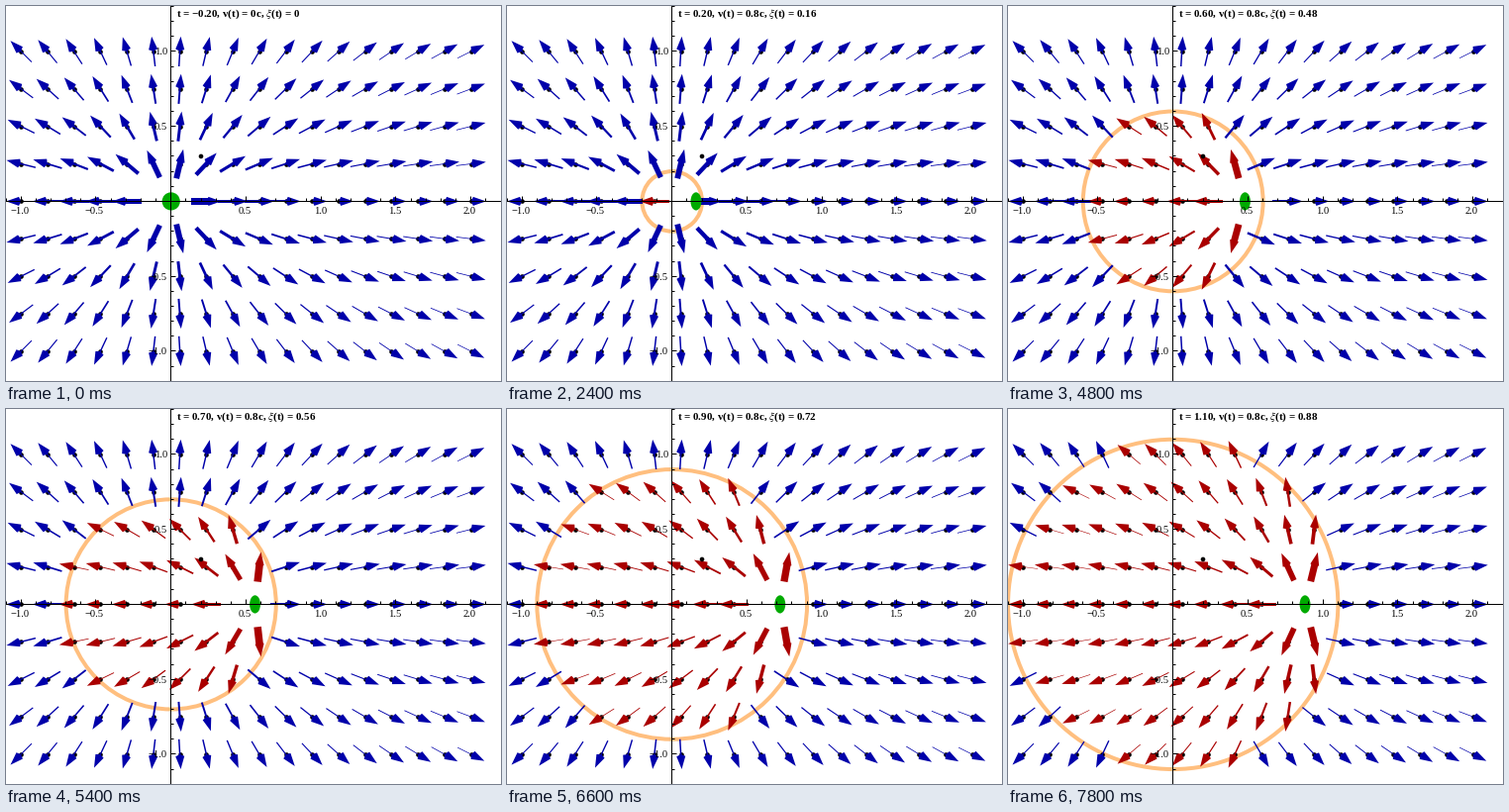
Recreate the animation shown at these times as a matplotlib script. Size 500 by 379 pixels, loop 8 s.

```python
import numpy as np
import matplotlib.pyplot as plt
from matplotlib.animation import FuncAnimation
from matplotlib.collections import LineCollection, PolyCollection
from matplotlib.patches import Circle, Ellipse

plt.rcParams["mathtext.fontset"] = "stix"

W, H, DPI = 500, 379, 100
PX = 72 / DPI                      # points per pixel
SCALE, ORIGIN = 151.5, np.array([166.7, 197.4])
AXIS = np.floor(ORIGIN) + 0.5      # axis lines sit on whole pixels
SPEED = 0.8
BLUE, RED, GREEN, ORANGE = "#0000aa", "#aa0000", "#00aa00", "#ff8000"
ARROW, HEAD, HEAD_BACK, HEAD_HALF = 30.3, 13, 15, 4.5
CHARGE_RADIUS, MIN_DISTANCE = 9.1, 0.2

GRID = [np.array([x, y]) for y in np.linspace(-1, 1, 9)
        for x in np.linspace(-1, 2, 18)]

fig = plt.figure(figsize=(W / DPI, H / DPI), dpi=DPI, facecolor="white")
ax = fig.add_axes([0, 0, 1, 1])
ax.set(xlim=(0, W), ylim=(H, 0))
ax.axis("off")


def to_px(point):
    return ORIGIN + SCALE * np.array([1, -1]) * point


def label(x, y, text, size=10.5, **kw):
    return ax.text(x, y, text, family="Liberation Serif", size=size * PX,
                   color="black", zorder=6, va="baseline", **kw)


def number(value, digits):
    return f"{value:.{digits}f}".replace("-", "\u2212")


def draw_axes():
    ox, oy = AXIS
    lines = [[(0, oy), (W, oy)], [(ox, 0), (ox, H)]]
    for i in range(-12, 23):
        length = 5 if i % 5 == 0 else 3
        x, y = np.floor(to_px(np.array([i / 10, i / 10]))) + 0.5
        if i >= -11:
            lines.append([(x, oy), (x, oy - length)])
        if i <= 13:
            lines.append([(ox, y), (ox + length, y)])
        if i % 5 == 0 and i != 0:
            text = number(i / 10, 1)
            label(x - 1, oy + 12.5, text, ha="center")
            if i <= 10:
                label(ox - 3.5, y + 3.5, text, ha="right")
    # Snapping would move lines at pixel centres to the next pixel.
    ax.add_collection(LineCollection(lines, colors="black", snap=False,
                                     linewidths=PX, zorder=5))


def field(point, source, v):
    """Direction, strength and distance for a charge moving along x."""
    r = point - source
    d = np.hypot(*r)
    if d < 1e-9:
        return r, 0, 0
    sin2 = (r[1] / d) ** 2
    strength = (1 - v * v) / (d * d * (1 - v * v * sin2) ** 1.5)
    return r / d, strength, d


def arrow_shapes(center, direction, width):
    u = direction * np.array([1, -1])
    n = np.array([-u[1], u[0]])
    tip, tail = center + u * ARROW / 2, center - u * ARROW / 2
    barb, back = tip - u * HEAD, tip - u * HEAD_BACK
    half = n * width / 2
    return ([tail + half, barb + half, barb - half, tail - half],
            [tip, barb + n * HEAD_HALF, back, barb - n * HEAD_HALF])


draw_axes()
ring = ax.add_patch(Circle(ORIGIN, 1, fill=False, ec=ORANGE, alpha=0.5,
                           lw=4 * PX, zorder=1))
dots = ax.scatter([], [], s=(4.6 * PX) ** 2, c="black", lw=0, zorder=2)
arrows = ax.add_collection(PolyCollection([], linewidths=0, zorder=3))
charge = ax.add_patch(Ellipse(ORIGIN, 1, 1, fc=GREEN, lw=0, zorder=4))
ax.add_patch(Circle(to_px(np.array([0.2, 0.3])), 2.3, fc="black", lw=0, zorder=4))
title = label(172, 11, "", size=11, weight="bold")


def draw(frame):
    t = round(-0.2 + 0.05 * (frame // 3), 2)
    v = SPEED if t >= 0 else 0
    xi = v * t
    shapes, colors, centers = [], [], []
    for point in GRID:
        inside = np.hypot(*point) < t - 1e-9
        source = np.array([xi if inside else 0, 0])
        direction, strength, d = field(point, source, v if inside else 0)
        if d < MIN_DISTANCE:
            continue
        center = to_px(point)
        shapes += arrow_shapes(center, direction, 1.5 * np.sqrt(strength))
        colors += [RED if inside else BLUE] * 2
        centers.append(center)
    arrows.set_verts(shapes)
    arrows.set_facecolor(colors)
    dots.set_offsets(centers)
    ring.set_visible(t > 0)
    ring.set_radius(max(t, 0) * SCALE)
    charge.set_center(to_px(np.array([xi, 0])))
    charge.width = 2 * CHARGE_RADIUS * np.sqrt(1 - v * v)
    charge.height = 2 * CHARGE_RADIUS
    title.set_text(f"t = {number(t, 2)}, v(t) = {v:g}c, "
                   rf"$\xi$(t) = {abs(xi):.3g}")
    return arrows, dots, ring, charge, title


anim = FuncAnimation(fig, draw, frames=80, interval=100, repeat=True,
                     repeat_delay=0, blit=False)
plt.show()
```
